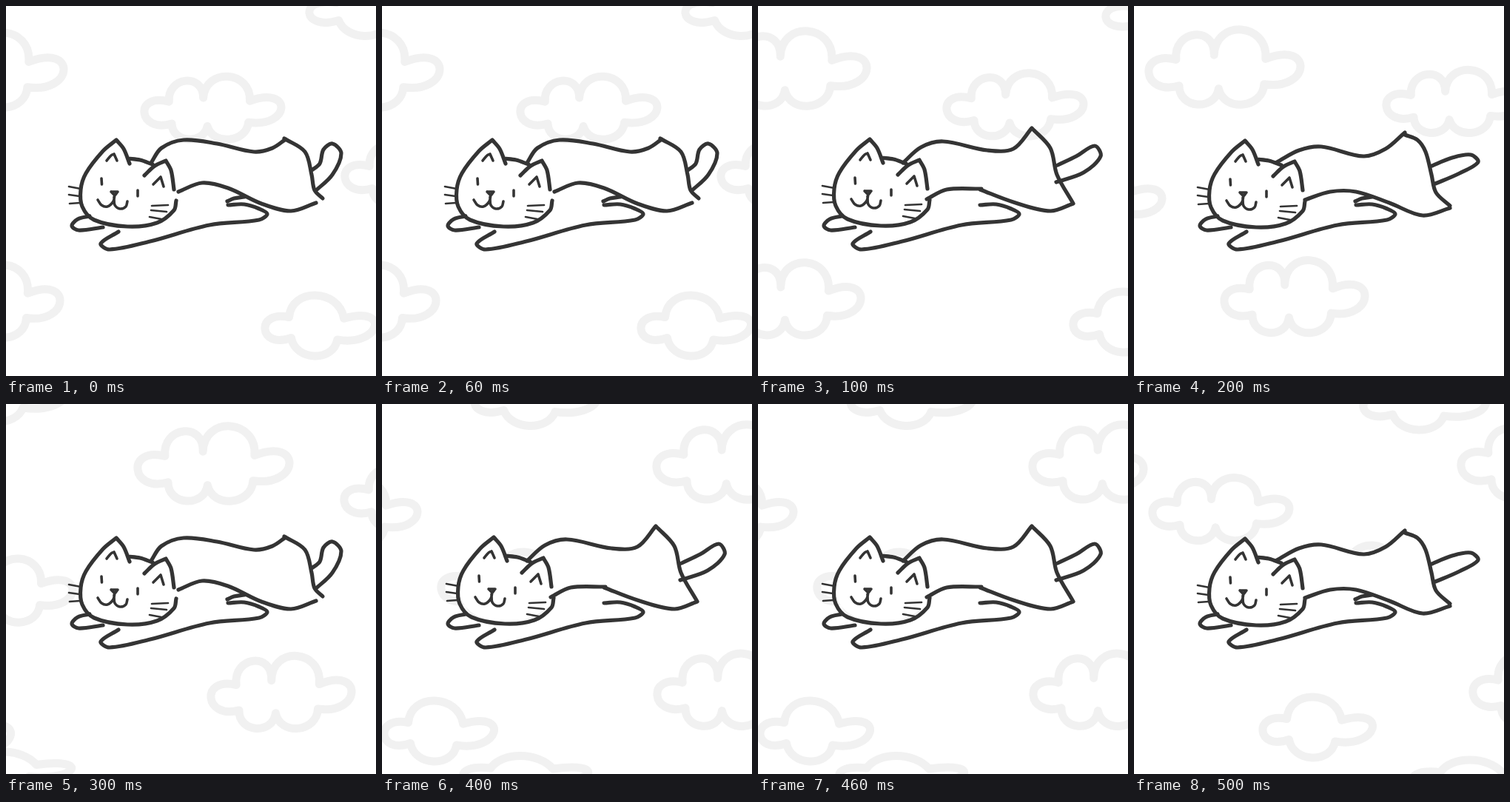
These frames come from a looping animation (500 by 500 pixels, 600 ms). An HTML page:

```html
<!DOCTYPE html>
<html lang="en">
<head>
<meta charset="utf-8">
<title>Cat flying past clouds</title>
<style>
  html, body { margin: 0; width: 100%; height: 100%; overflow: hidden; background: #fff; }
  svg { display: block; width: 100vw; height: 100vh; }
  path { fill: none; stroke-linecap: round; stroke-linejoin: round; }
  .sky path { stroke: #f1f1f1; stroke-width: 11; }
  .cat path { stroke: #343434; }
  .cat .line { stroke-width: 5.2; }
  .cat .face { stroke-width: 3.6; }
  .cat .hair { stroke-width: 2.7; }
  .mask { fill: #fff; }
  .sky { visibility: hidden; animation: sky 600ms step-end infinite; }
  .cat { visibility: hidden; animation: cat 300ms step-end infinite; }
  @keyframes sky { 0% { visibility: visible; } 16.66%, 100% { visibility: hidden; } }
  @keyframes cat { 0% { visibility: visible; } 33.33%, 100% { visibility: hidden; } }
</style>
</head>
<body>
<svg viewBox="0 0 500 500">
  <g id="clouds"></g>
  <path class="mask" d="M198 214L240 186 300 200 335 200 364 184 393 200 402 240 412 265 385 275 340 265 350 283 300 290 150 320 230 280 228 250Z"/>
  <path class="mask" d="M103 250Q107 225 122 208L150 185 165 208 198 214 216 212 228 248 228 270Q205 295 160 295 110 290 103 250Z"/>
  <g id="cats"></g>
</svg>
<script>
const STEP = 100, SKIES = 6, POSES = 3;
const points = s => s.trim().split(/\s+/).map(p => p.split(',').map(Number));
const xy = p => p.map(v => v.toFixed(1)).join(' ');
const dist = (a, b) => Math.hypot(a[0] - b[0], a[1] - b[1]);

function add(parent, tag, attrs) {
  const el = document.createElementNS('http://www.w3.org/2000/svg', tag);
  for (const k in attrs) el.setAttribute(k, attrs[k]);
  return parent.appendChild(el);
}

// Groups that take turns: group i of n shows during its own step.
const turns = (parent, name, n) => Array.from({ length: n }, (_, i) =>
  add(parent, 'g', { class: name, style: `animation-delay:${(i - n) * STEP}ms` }));

const skies = turns(clouds, 'sky', SKIES);
const poses = turns(cats, 'cat', POSES);

// Round lobe from a to b whose crown is m; taller lobes bulge wider.
function lobe(a, m, b) {
  const rise = dist(m, [(a[0] + b[0]) / 2, (a[1] + b[1]) / 2]);
  const w = Math.min(2, 0.33 + 1.33 * rise / dist(a, b)) / 2;
  const ctrl = side => [0, 1].map(i => (8 * m[i] - a[i] - b[i]) / 6 + side * w * (b[i] - a[i]));
  return `C${xy(ctrl(-1))} ${xy(ctrl(1))} ${xy(b)}`;
}

// Closed outlines in a unit box: notch, crown, notch, crown ...
const twin = points('.18,.4 0,.58 .2,.75 .32,1 .46,.79 .62,1 .76,.73 1,.5 .77,.39 .61,0 .43,.34 .3,.07');
const single = points('.22,.36 0,.56 .24,.7 .45,1 .66,.73 1,.52 .72,.38 .46,0');

function cloud(shape, x, y, w, h) {
  const p = shape.map(([u, v]) => [x + u * w, y + v * h]);
  let d = 'M' + xy(p[0]);
  for (let i = 0; i < p.length; i += 2) d += lobe(p[i], p[i + 1], p[(i + 2) % p.length]);
  return d + 'Z';
}

// One cloud crossing the stage: a left edge per step, an even drift in height.
function drift(shape, start, [w, h], [top, end], xs) {
  xs.forEach((x, k) => {
    const y = top + (end - top) * k / (xs.length - 1);
    add(skies[(start + k) % SKIES], 'path', { d: cloud(shape, x, y, w, h) });
  });
}

drift(twin,   4, [185, 85],  [104, 82],  [-137, 25, 187, 255, 341, 457]);
drift(twin,   5, [205, 101], [38, 26],   [-192, -127, -58, 20, 178, 371, 442]);
drift(twin,   2, [185, 86],  [218, 182], [-147, -95, 80, 210, 458]);
drift(twin,   0, [190, 98],  [350, 334], [-117, -51, 122, 277, 372, 458]);
drift(single, 3, [148, 82],  [406, 386], [-142, 3, 174, 350, 426]);
drift(single, 3, [168, 46],  [470, 481], [-80, 110, 377]);
drift(single, 3, [165, 70],  [-46, -24], [-86, 125, 310, 410, 470]);

// Smooth curve through the points, handles scaled to each span.
function curve(p) {
  let d = '';
  for (let i = 0; i + 1 < p.length; i++) {
    const b = p[i], c = p[i + 1], a = p[i - 1] || b, e = p[i + 2] || c;
    const len = dist(b, c), s = len / (dist(a, b) + len) / 3, t = len / (dist(c, e) + len) / 3;
    d += `C${xy(b.map((v, k) => v + (c[k] - a[k]) * s))} ${xy(c.map((v, k) => v - (e[k] - b[k]) * t))} ${xy(c)}`;
  }
  return d;
}

// ";" lifts the pen, "/" makes a corner.
function strokes(s) {
  return s.split(';').map(line => {
    const parts = line.split('/').map(points);
    return 'M' + xy(parts[0][0]) +
      parts.map((p, i) => curve(i ? [parts[i - 1].at(-1), ...p] : p)).join('');
  }).join('');
}

const head = `168,213 160,193 150,181 / 132,196 109,226 102,248 104,271 120,289 165,298 205,293 228,276 231,263;
  166,206 182,208 199,214; 188,229 202,216 217,209 / 224,222 228,248`;
const face = `137,209 143,202 147,200 / 151,209; 200,241 210,231 / 214,244; 130,233 130.5,241; 179,249 179,257;
  143,251 152,251 / 148,256 / 143,251; 125,262 130,269 138,271 146,264 148,255; 147,258 148,269 155,274 163,271 165,264`;
const hair = '86,244 102,247; 86,255 100,257; 87,267 101,266; 198,270 220,269; 197,276 218,278; 195,285 211,288';
const legs = `300,269 322,268 342,274 353,281 342,289 275,296 195,318 140,329 128,321 152,305;
  113,284 97,288 89,297 98,303 131,299`;
const toe = '; 299,264 308,260 322,258';

function cat(i, nudge, body) {
  const parts = [['line', body], ['line', legs], ['line', head], ['face', face], ['hair', hair]];
  parts.forEach(([name, s], k) =>
    add(poses[i], 'path', { class: name, d: strokes(s), transform: `translate(${k > 1 ? nudge : 0})` }));
}

// Back, rump, belly, tail.
cat(0, [-1, 0], `196,212 210,192 240,181 285,186 335,197 360,192 378,180; 376,179 404,197 413,228 417,249 428,260;
  419,266 385,277 345,267 300,246 265,239 233,251;
  413,222 424,213 429,194 441,186 453,199 441,228 418,250` + toe);
cat(1, [1, -1], `196,212 220,191 250,183 310,195 345,193 370,165 / 395,192 404,228 426,267 / 395,277 345,265 300,248;
  228,261 255,248 302,247;
  405,215 430,203 455,189 463,203 440,225 403,238`);
cat(2, [0, 1], `193,211 223,195 253,190 310,203 340,193 366,171; 366,174 383,181 394,197 402,228 408,252 427,270;
  427,273 390,283 345,266 300,251 265,251 231,262;
  400,217 430,205 455,201 465,211 440,226 405,241` + toe);
</script>
</body>
</html>
```
